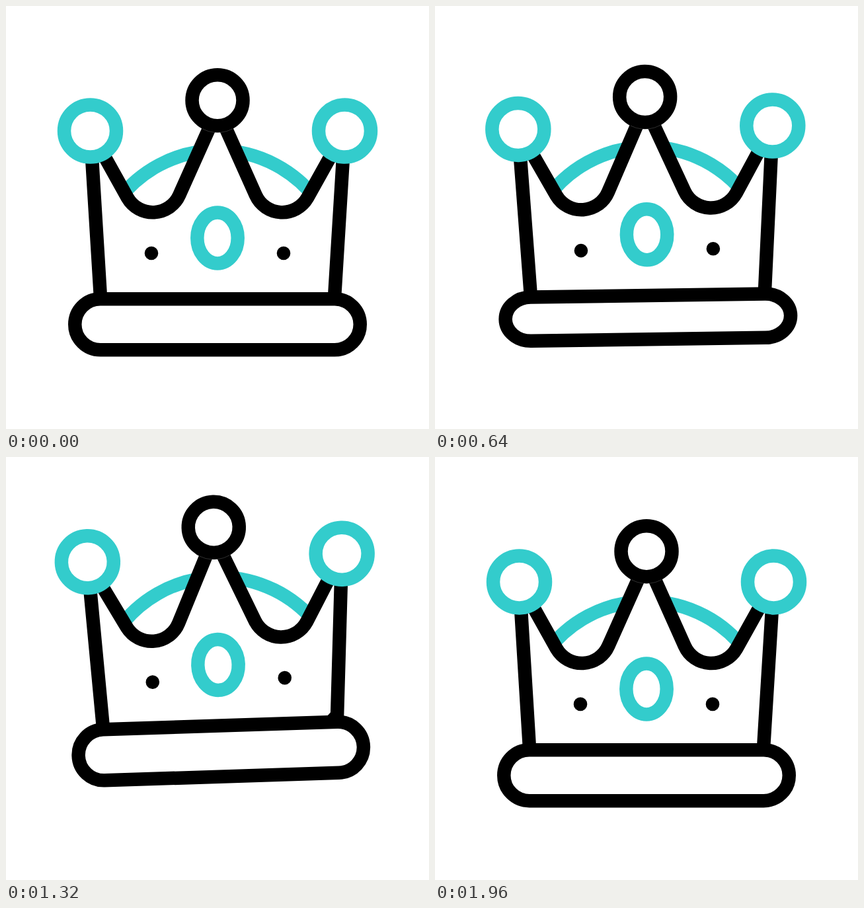
Animation, 640 px wide and 640 px high, one loop 2 s. Source, as an HTML page:

```html
<!DOCTYPE html>
<html lang="en">
<head>
<meta charset="utf-8">
<title>Jumping crown</title>
<style>
  html, body { margin: 0; width: 100%; height: 100%; overflow: hidden; background: #fff; }
  svg { display: block; width: 100%; height: 100%; }
  .line { fill: #fff; stroke: #000; stroke-width: 20.5; stroke-linejoin: round; }
  .teal { stroke: #3cc; }
  .open { fill: none; }
  .seam { fill: none; stroke: #444; stroke-width: .7; }
</style>
</head>
<body>
<svg viewBox="0 0 640 640">
  <g id="crown">
    <g id="body">
      <path class="line teal open" d="M170 293.2A188 188 0 0 1 470 293.2"/>
      <path class="line" d="M143.1 443L127.5 189L183.9 290.2A44 44 0 0 0 262.2 286.1L320 157L377.8 286.1A44 44 0 0 0 456.1 290.2L512.5 189L496.9 443"/>
      <path id="corner" d="M0 0H-26L0 -26Z"/>
      <circle class="line teal" cx="127.5" cy="189" r="39.5"/>
      <circle class="line teal" cx="512.5" cy="189" r="39.5"/>
      <circle class="line" cx="320" cy="142.75" r="38.5"/>
      <path class="seam" d="M297 185.8A48.8 48.8 0 0 0 316 191.4M343 185.8A48.8 48.8 0 0 1 324 191.4"/>
      <ellipse class="line teal" cx="320" cy="351" rx="30.7" ry="38.5"/>
      <circle cx="220" cy="374" r="10.3"/>
      <circle cx="420" cy="374" r="10.3"/>
    </g>
    <rect id="base" class="line" x="104.25" width="431.5" rx="38.5"/>
  </g>
</svg>
<script>
  const LOOP = 2000, STEP = 40;
  const [crown, body, corner, base] =
    ['crown', 'body', 'corner', 'base'].map(id => document.getElementById(id));

  // Easing with control points (x1, 0) and (x2, 1)
  const ease = (x1, x2) => p => {
    let lo = 0, hi = 1;
    for (let i = 0; i < 24; i++) {
      const u = (lo + hi) / 2, v = 1 - u;
      if (3 * u * v * v * x1 + 3 * u * u * v * x2 + u ** 3 < p) lo = u; else hi = u;
    }
    return lo * lo * (3 - 2 * lo);
  };
  const soft = ease(.333, .667), glide = ease(.333, 0);
  const crouch = ease(.333, .333), fall = ease(.333, .75);

  // Keys: [time, value, easing towards this key]
  const track = keys => t => {
    const i = keys.findIndex(k => k[0] > t);
    if (i < 0) return keys[keys.length - 1][1];
    if (i === 0) return keys[0][1];
    const [t0, v0] = keys[i - 1], [t1, v1, easing] = keys[i];
    return v0 + (v1 - v0) * easing((t - t0) / (t1 - t0));
  };
  const squash = track([[120, 0], [520, 14.5, crouch], [1160, 0, glide]]);
  const jump = track([[520, 0], [1160, 1, glide], [1520, 0, fall]]);
  const hop = track([[1520, 0], [1680, 18, soft], [2000, 0, glide]]);

  function draw(t) {
    const s = squash(t), j = jump(t), rise = 59 * j + hop(t);
    crown.setAttribute('transform', `translate(0 ${-rise}) rotate(${-3 * j} 320 320)`);
    body.setAttribute('transform', `translate(0 ${s})`);
    corner.setAttribute('transform', `translate(492 436) scale(${Math.max(0, (j - .3) / .7)})`);
    base.setAttribute('y', 443.25 + s);
    base.setAttribute('height', 77 - s);
    base.setAttribute('ry', (77 - s) / 2);
  }

  function tick() {
    const t = (performance.now() + 8) % LOOP;
    draw(Math.floor(t / STEP) * STEP);
    requestAnimationFrame(tick);
  }
  tick();
</script>
</body>
</html>
```
